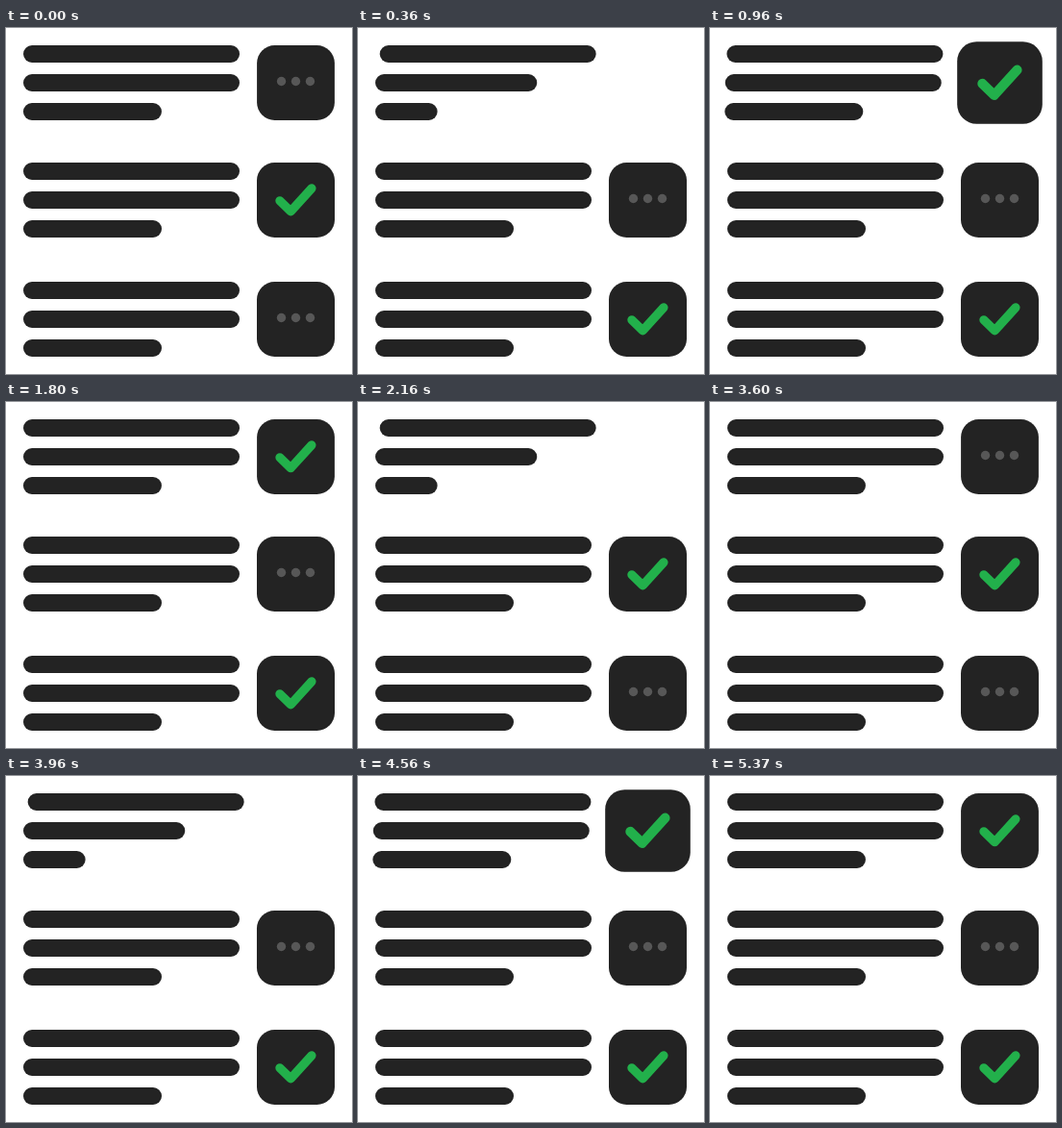
An HTML page with a canvas for the animation above (5400 ms loop, 360 by 360 pixels).

```html
<!DOCTYPE html>
<html lang="en">
<head>
<meta charset="utf-8">
<title>Checklist</title>
<style>
  html, body { margin: 0; width: 100%; height: 100%; overflow: hidden; background: #fff; }
  canvas { display: block; width: 360px; height: 360px; }
</style>
</head>
<body>
<canvas id="stage" width="360" height="360"></canvas>
<script>
const ctx = document.getElementById('stage').getContext('2d');
const LOOP = 5400, CYCLE = 1800;
const SCROLL = 300, GROW = 281;
const LINE_START = 57, LINE_GAP = 100, BOX_START = 430;
const DARK = '#232323', GREEN = '#22b04b', GREY = '#575757';
const ROWS = [18, 140, 264, 388];
const WIDTHS = [225, 225, 144];

const clamp = v => Math.max(0, Math.min(1, v));
const mix = (a, b, p) => a + (b - a) * p;
const easeInOut = p => p < 0.5 ? 4 * p ** 3 : 1 - (2 - 2 * p) ** 3 / 2;

// Damped swing that follows the end of a linear move
function swing(ms) {
  const s = ms / 1000;
  return s <= 0 ? 0 : Math.sin(3 * Math.PI * s) * Math.exp(-4.5 * s);
}

function stroke(points, width, color) {
  ctx.beginPath();
  points.forEach(([x, y]) => ctx.lineTo(x, y));
  ctx.lineWidth = width;
  ctx.strokeStyle = color;
  ctx.lineCap = ctx.lineJoin = 'round';
  ctx.stroke();
}

function drawLine(i, y, age) {
  const t = age - LINE_START - i * LINE_GAP;
  if (t <= 0) return;
  const x = 27 + 24 * swing(t - GROW);
  const cy = y + 9 + i * 30;
  stroke([[x, cy], [x + (WIDTHS[i] - 18) * clamp(t / GROW) + 0.01, cy]], 18, DARK);
}

function drawBox(y, age, checked) {
  const t = age - BOX_START;
  if (t <= 0) return;
  const k = clamp(t / GROW) + 0.41 * swing(t - GROW);
  ctx.save();
  ctx.translate(301.5, y + 39);
  ctx.scale(k, k);
  ctx.fillStyle = DARK;
  ctx.beginPath();
  ctx.roundRect(-40.5, -39, 81, 78, 18.5);
  ctx.fill();
  if (checked) {
    stroke([[-16.6, 0.8], [-5.3, 11.8], [16.5, -12.2]], 9.2, GREEN);
  } else {
    ctx.fillStyle = GREY;
    for (const x of [-15, 0, 15]) {
      ctx.beginPath();
      ctx.arc(x, -1.5, 4.7, 0, Math.PI * 2);
      ctx.fill();
    }
  }
  ctx.restore();
}

function drawItem(y, age, checked) {
  WIDTHS.forEach((_, i) => drawLine(i, y, age));
  drawBox(y, age, checked);
}

function render(time) {
  const t = time % LOOP;
  const cycle = Math.floor(t / CYCLE);
  const local = t % CYCLE;
  const shift = easeInOut(clamp(local / SCROLL));
  ctx.fillStyle = '#fff';
  ctx.fillRect(0, 0, 360, 360);
  // Older items slide down one place, the newest is drawn in on top
  for (let n = 3; n >= 0; n--) {
    const y = n ? mix(ROWS[n - 1], ROWS[n], shift) : ROWS[0];
    drawItem(y, local + n * CYCLE, (cycle + n) % 2 === 0);
  }
}

const start = performance.now();
function frame() {
  render(performance.now() - start);
  requestAnimationFrame(frame);
}
frame();
</script>
</body>
</html>
```
